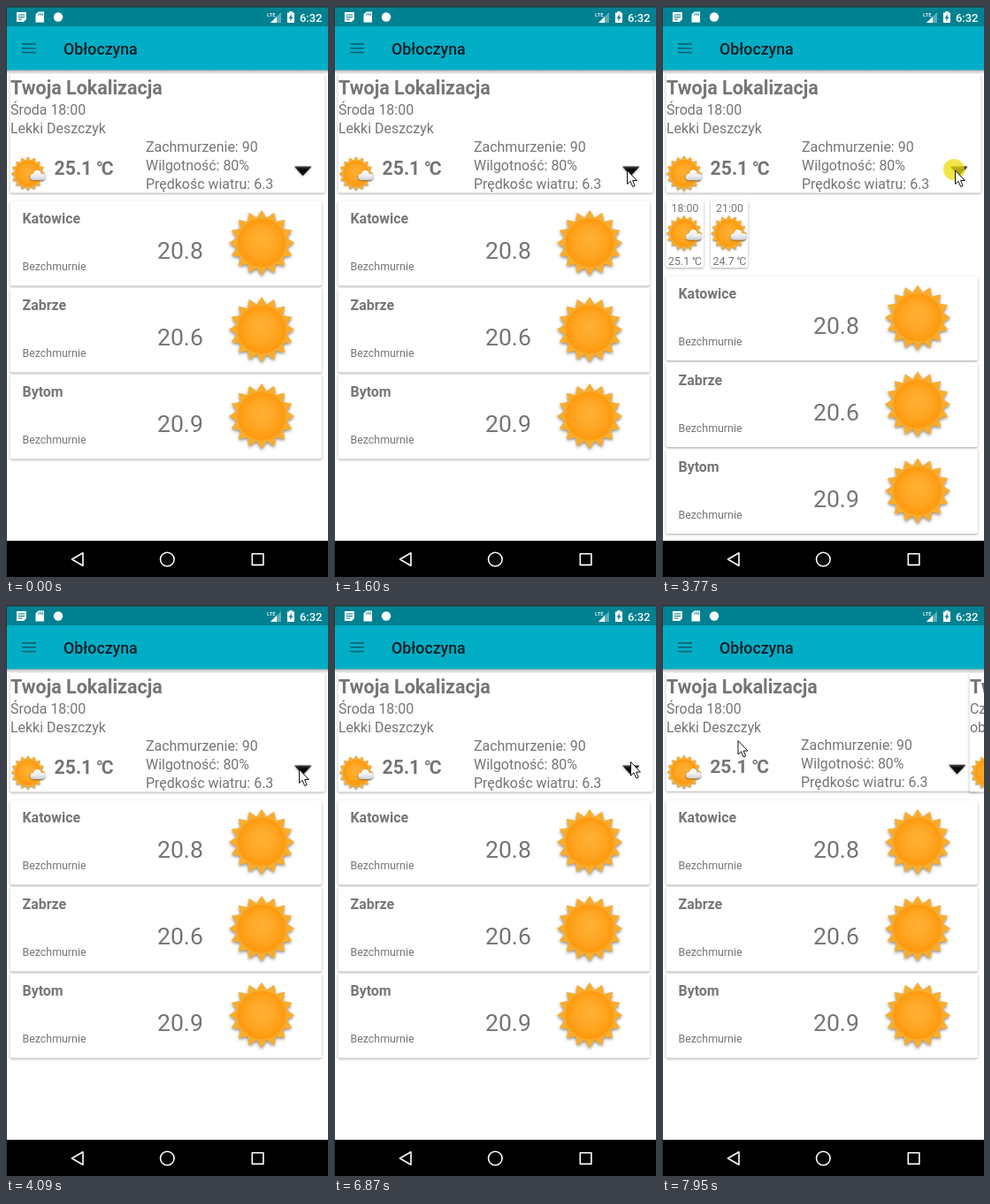
These frames come from a looping animation (364 px wide and 646 px high, 8 s). An HTML page with a canvas:

```html
<!DOCTYPE html>
<html lang="pl">
<head>
<meta charset="utf-8">
<title>Obłoczyna</title>
<style>
  html, body { margin: 0; width: 100%; height: 100%; overflow: hidden; background: #fff; }
  canvas { display: block; width: 364px; height: 646px; }
</style>
</head>
<body>
<canvas id="stage"></canvas>
<script>
const W = 364, H = 646, LOOP = 8000;
const GREY = '#757575', STATUS = '#008191';
const canvas = document.getElementById('stage');
const ratio = window.devicePixelRatio || 1;
canvas.width = W * ratio;
canvas.height = H * ratio;
const ctx = canvas.getContext('2d');

const CITIES = [['Katowice', '20.8'], ['Zabrze', '20.6'], ['Bytom', '20.9']];
const HOURS = [['18:00', '25.1 ℃'], ['21:00', '24.7 ℃']];

// Pointer moves: start, end, number of steps, from, to.
const MOVES = [
  { start: 520, end: 1140, steps: 9, from: [228, 593], to: [331, 185.5], appears: true },
  { start: 4630, end: 5010, steps: 6, from: [331, 185.5], to: [273.5, 273.5] },
  { start: 5720, end: 5720, steps: 1, from: [273.5, 273.5], to: [273.5, 274.5] },
  { start: 6480, end: 6870, steps: 6, from: [273.5, 274.5], to: [335, 177] },
  { start: 7330, end: 7950, steps: 9, from: [335, 177], to: [85.5, 153] }
];

const within = (t, a, b) => t >= a && t < b;
const ease = p => p * p * (3 - 2 * p);
const mix = (a, b, p) => a + (b - a) * p;

function text(str, x, y, size, weight = 400, color = GREY, align = 'left') {
  ctx.font = `${weight} ${size}px Roboto, "Noto Sans CJK JP", "Noto Sans CJK SC", sans-serif`;
  ctx.textAlign = align;
  ctx.fillStyle = color;
  ctx.fillText(str, x, y);
}

function rect(x, y, w, h, color) {
  ctx.fillStyle = color;
  ctx.fillRect(x, y, w, h);
}

function poly(points, color) {
  ctx.beginPath();
  points.forEach(([x, y]) => ctx.lineTo(x, y));
  ctx.closePath();
  if (color) {
    ctx.fillStyle = color;
    ctx.fill();
  }
}

function circle(x, y, r, color) {
  ctx.beginPath();
  ctx.arc(x, y, r, 0, Math.PI * 2);
  ctx.fillStyle = color;
  ctx.fill();
}

function shadow(color, blur, dy) {
  ctx.shadowColor = color;
  ctx.shadowBlur = blur * ratio;
  ctx.shadowOffsetY = dy * ratio;
}

function card(x, y, w, h) {
  ctx.save();
  shadow('rgba(0,0,0,.34)', 2.6, 1);
  ctx.beginPath();
  ctx.roundRect(x, y, w, h, 2);
  ctx.fillStyle = '#fff';
  ctx.fill();
  ctx.restore();
}

function sun(x, y, r) {
  const spikes = 16, points = [];
  for (let i = 0; i < spikes * 2; i++) {
    const a = -Math.PI / 2 + i * Math.PI / spikes;
    const d = i % 2 ? r * 0.78 : r;
    points.push([x + d * Math.cos(a), y + d * Math.sin(a)]);
  }
  ctx.save();
  shadow('rgba(70,60,50,.6)', r * 0.1, r * 0.045);
  poly(points, '#f8ad2f');
  ctx.restore();
  const rim = ctx.createRadialGradient(x, y, r * 0.68, x, y, r * 0.8);
  rim.addColorStop(0, '#f39d18');
  rim.addColorStop(1, 'rgba(248,173,47,0)');
  circle(x, y, r * 0.8, rim);
  const disc = ctx.createRadialGradient(x, y - r * 0.12, 0, x, y, r * 0.74);
  disc.addColorStop(0, '#ffb136');
  disc.addColorStop(0.6, '#ffa623');
  disc.addColorStop(1, '#ff980a');
  circle(x, y, r * 0.73, disc);
}

function cloudySun(x, y, scale = 1) {
  sun(x, y, 20 * scale);
  ctx.save();
  ctx.translate(x + 10.5, y + 2);
  ctx.scale(scale * 0.93, scale * 0.93);
  const fill = ctx.createLinearGradient(0, -7, 0, 7);
  fill.addColorStop(0, '#fff');
  fill.addColorStop(0.55, '#eceff2');
  fill.addColorStop(1, '#c3cad1');
  shadow('rgba(60,50,40,.6)', 2, 0.8);
  ctx.beginPath();
  ctx.arc(-5, 2, 4, Math.PI / 2, Math.PI * 1.45);
  ctx.arc(0, -1.5, 5, Math.PI * 1.05, Math.PI * 1.9);
  ctx.arc(6, 2, 4, Math.PI * 1.35, Math.PI / 2);
  ctx.closePath();
  ctx.fillStyle = fill;
  ctx.fill();
  ctx.restore();
}

function statusBar() {
  rect(0, 0, W, 23, STATUS);
  // note
  poly([[12, 7], [23, 7], [23, 15], [20, 18], [12, 18]], '#fff');
  [9.5, 12, 14.5].forEach((y, i) => rect(14, y, i === 2 ? 4 : 7, 1.1, STATUS));
  // memory card
  poly([[36.5, 6.5], [43, 6.5], [43, 18.5], [33.5, 18.5], [33.5, 9.5]], '#fff');
  [36.5, 38.7, 40.8].forEach(x => rect(x, 8, 1, 2.8, STATUS));
  circle(59, 12.5, 5.2, '#fff');
  // signal
  poly([[311, 7], [311, 19], [299, 19]], 'rgba(255,255,255,.35)');
  poly([[306, 12], [306, 19], [299, 19]], '#fff');
  text('LTE', 295, 11.5, 6, 500, '#fff');
  // battery
  rect(318, 7.5, 8, 11.5, '#fff');
  rect(320.3, 6, 3.4, 2, '#fff');
  poly([[322.8, 9], [319.6, 13.8], [321.6, 13.8], [321.2, 17.3], [324.4, 12.4], [322.4, 12.4]], STATUS);
  text('6:32', 357.5, 17.5, 13, 500, '#fff', 'right');
}

function appBar() {
  const fade = ctx.createLinearGradient(0, 72, 0, 77);
  fade.addColorStop(0, 'rgba(0,0,0,.32)');
  fade.addColorStop(1, 'rgba(0,0,0,0)');
  rect(0, 72, W, 5, fade);
  rect(0, 23, W, 49.5, '#02adc6');
  [43, 47.8, 52.6].forEach(y => rect(18, y - 0.8, 16, 1.6, '#09626e'));
  text('Obłoczyna', 65, 55, 17.72, 500, '#071e22');
}

function navBar() {
  rect(0, 605, W, 41, '#000');
  ctx.strokeStyle = '#fff';
  ctx.lineWidth = 1.6;
  ctx.lineJoin = 'round';
  poly([[74.5, 626], [87, 618.8], [87, 633.2]]);
  ctx.stroke();
  ctx.beginPath();
  ctx.arc(182.3, 626, 7.8, 0, Math.PI * 2);
  ctx.stroke();
  ctx.strokeRect(278.3, 619.8, 12.6, 12.6);
}

function locationCard(day, sky, open) {
  card(4.5, 76.5, 356, 135);
  text('Twoja Lokalizacja', 5, 100, 21.45, 700);
  text(day, 5, 123, 15.95);
  text(sky, 5, 144, 15.95);
  cloudySun(25, 189.5, open ? 1.02 : 0.97);
  text('25.1 ℃', 54.5, 191, 21.26, 700);
  text('Zachmurzenie: 90', 158, 165, 15.95);
  text('Wilgotność: 80%', 158, 186, 15.95);
  text('Prędkośc wiatru: 6.3', 158, 207, 15.95);
  ctx.save();
  shadow('rgba(0,0,0,.6)', 2.4, 0.5);
  const shade = ctx.createLinearGradient(0, 181, 0, 189);
  shade.addColorStop(0, '#4a4f4a');
  shade.addColorStop(0.5, '#050805');
  poly([[326, 181.5], [345.5, 181.5], [335.5, 192]], shade);
  ctx.restore();
}

function cityCard([name, temp], y) {
  card(4.5, y, 352.5, 95.5);
  text(name, 18.5, y + 25, 15.95, 700);
  text('Bezchmurnie', 18.5, y + 78, 12.4);
  text(temp, 171, y + 65, 26.58);
  sun(289, y + 47, 37);
}

function hourCard([hour, temp], x) {
  card(x, 220, 42.5, 76);
  text(hour, x + 21.5, 232.5, 12.4, 400, GREY, 'center');
  cloudySun(x + 20.5, 257, 1.02);
  text(temp, x + 21.5, 293, 12.4, 400, GREY, 'center');
}

function pointer(t) {
  let spot = null;
  for (const m of MOVES) {
    if (t < m.start) break;
    const gap = (m.end - m.start) / Math.max(1, m.steps - 1) || 1;
    const i = Math.min(m.steps - 1, Math.floor((t - m.start) / gap + 1e-6));
    const p = ease(m.appears ? i / (m.steps - 1) : (i + 1) / m.steps);
    spot = m.from.map((v, k) => mix(v, m.to[k], p));
  }
  if (!spot) return;
  ctx.save();
  ctx.translate(...spot);
  poly([[0.5, 0.5], [0.5, 16], [4, 12.8], [6.7, 19], [9.2, 18], [6.6, 12], [11.4, 12]], '#fff');
  ctx.strokeStyle = '#111';
  ctx.lineWidth = 1;
  ctx.stroke();
  ctx.restore();
}

function draw(t) {
  ctx.setTransform(ratio, 0, 0, ratio, 0, 0);
  rect(0, 0, W, H, '#fff');

  const open = within(t, 1670, 4020);
  const pressed = within(t, 1520, 1600) || within(t, 3770, 3940);
  const slide = t >= 7950 ? 21 : t >= 7872 ? 7 : 0;

  CITIES.forEach((city, i) => cityCard(city, 221 + i * 98 + (open ? 84.5 : 0)));
  if (open) HOURS.forEach((hour, i) => hourCard(hour, 4.5 + i * 50.5));

  // The current page shrinks slightly while the next one slides over it.
  const scale = 1 - 0.006 * slide / 21;
  ctx.save();
  ctx.translate(4, 76);
  ctx.scale(scale, scale);
  ctx.translate(-4, -76);
  locationCard('Środa 18:00', 'Lekki Deszczyk', open);
  ctx.restore();
  if (slide) {
    ctx.save();
    ctx.translate(W - slide, 0);
    locationCard('Czwartek 18:00', 'obfite opady', false);
    ctx.restore();
  }

  appBar();
  statusBar();
  navBar();
  rect(0, 0, W, 1.6, '#23393d');
  rect(0, 0, 1, H, '#2b3436');

  if (pressed) circle(330, 185, 12, 'rgba(240,220,10,.75)');
  pointer(t);
}

function frame() {
  draw(performance.now() % LOOP);
  requestAnimationFrame(frame);
}
frame();
</script>
</body>
</html>
```
